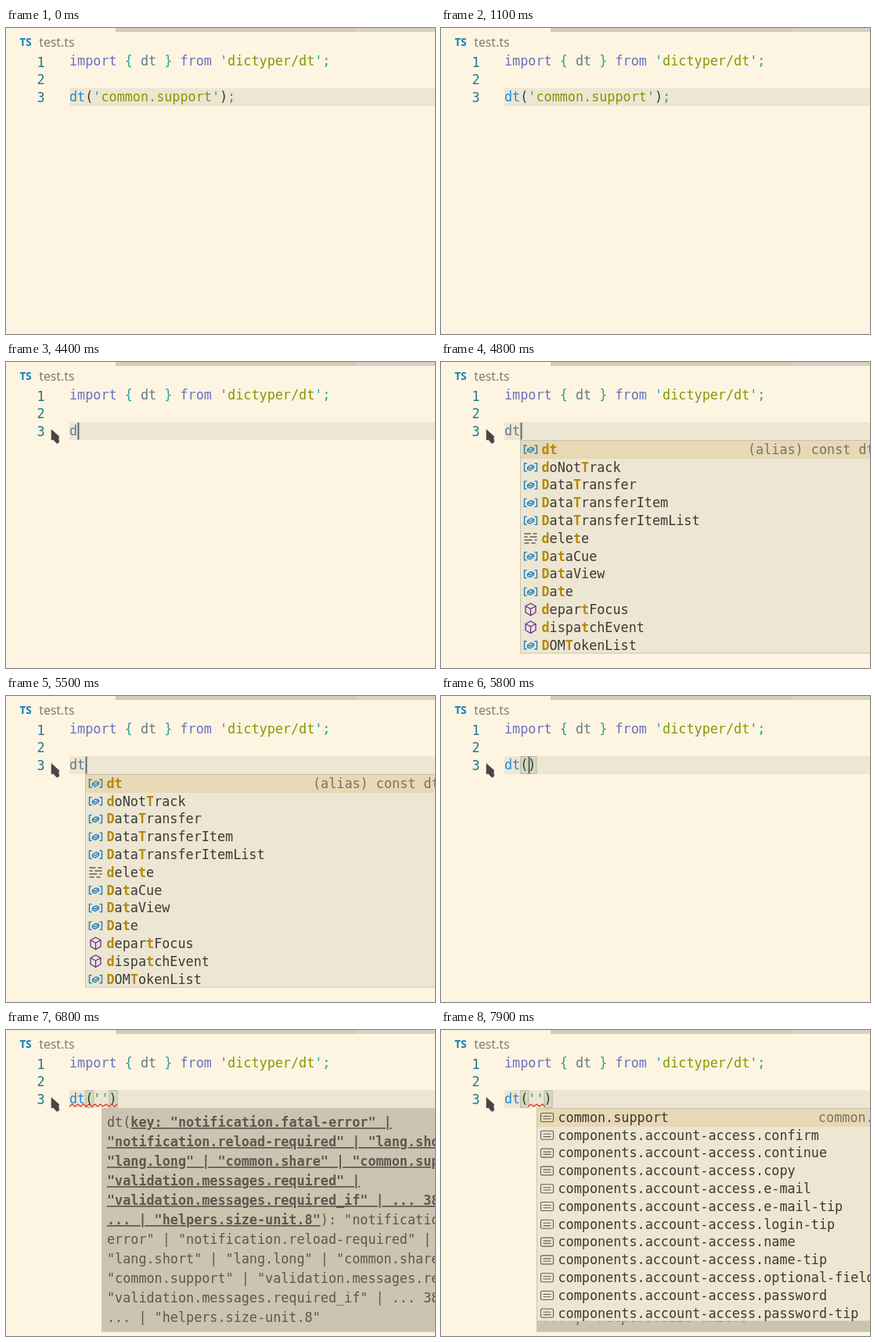
Animation, 548 px wide and 392 px high, one loop 8000 ms. Source, as an HTML page:

```html
<!DOCTYPE html>
<html lang="en">
<head>
<meta charset="utf-8">
<title>Typed dictionary keys</title>
<style>
  html, body { margin: 0; width: 100%; height: 100%; overflow: hidden; background: #fdf5e2; }
  svg { display: block; }
  text { white-space: pre; font: 16.8px "DejaVu Sans Mono", "Noto Sans Mono", monospace; }
  .ui { font: 15.8px "Noto Sans", "Open Sans", sans-serif; }
  .badge { font: 700 13.5px "Noto Sans", "Open Sans", sans-serif; }
  .b { font-weight: 700; }
  .u { font-weight: 700; text-decoration: underline; }
</style>
</head>
<body>
<svg id="stage" width="548" height="392" viewBox="0 0 548 392" xmlns="http://www.w3.org/2000/svg"></svg>
<script>
const LOOP = 8000, STEP = 100;
const CHAR = 10.11, ROW = 22.8, LEFT = 81;
const INK = '#657b83', BLUE = '#268bd2', CYAN = '#2aa198', GREEN = '#859900',
      VIOLET = '#6c71c4', DARK = '#3d3a34', GOLD = '#b58900', SIG = '#5c5850';

const T = { select: 3600, clear: 4000, d: 4400, t: 4500, words: 4700,
            paren: 5600, hint: 5900, quote: 6200, recheck: 6900, keys: 7100 };
const EDITS = [T.clear, T.d, T.t, T.paren, T.quote];

const col = n => LEFT + n * CHAR;
const esc = s => s.replace(/&/g, '&amp;').replace(/</g, '&lt;');
const rect = (x, y, w, h, fill, extra = '') =>
  `<rect x="${x}" y="${y}" width="${w}" height="${h}" fill="${fill}" ${extra}/>`;
const path = (d, stroke, width = 1.2, fill = 'none') =>
  `<path d="${d}" fill="${fill}" stroke="${stroke}" stroke-width="${width}" stroke-linejoin="round"/>`;
// Each run is [text, colour, class].
const text = (x, y, runs, cls = '') => `<text x="${x}" y="${y}" class="${cls}">` +
  runs.map(([s, fill, c = '']) => `<tspan fill="${fill}" class="${c}">${esc(s)}</tspan>`).join('') + '</text>';

const icons = {
  variable: (x, y) => path(`M${x - 5} ${y - 5}h-3v10h3M${x + 5} ${y - 5}h3v10h-3`, '#1a80bb', 1.4) +
    path(`M${x - 4} ${y}l4.5 -3l3.5 1.5v2.5l-4.5 3l-3.5 -1.5zl3.5 1.3l4.5 -2.8`, '#1a80bb', 1.3),
  keyword: (x, y) => path(`M${x - 8} ${y - 6}h8m3 0h5M${x - 8} ${y - 2}h4m3 0h9` +
    `M${x - 8} ${y + 2}h10m3 0h3M${x - 8} ${y + 6}h6m3 0h5`, '#615e56', 1.3),
  method: (x, y) => path(`M${x} ${y - 8}l6.5 3.5v8l-6.5 4l-6.5 -4v-8zM${x - 6.5} ${y - 4.5}` +
    `l6.5 3.5l6.5 -3.5M${x} ${y - 1}v8.5`, '#652d90', 1.3),
  value: (x, y) => rect(x - 8, y - 5.5, 16, 11, 'none', 'rx="1.5" stroke="#625f57" stroke-width="1.1"') +
    path(`M${x - 5} ${y - 1.5}h10M${x - 5} ${y + 1.8}h10`, '#625f57', 1.1)
};

const words = ['dt', 'doNotTrack', 'DataTransfer', 'DataTransferItem', 'DataTransferItemList',
  'delete', 'DataCue', 'DataView', 'Date', 'departFocus', 'dispatchEvent', 'DOMTokenList'];
const wordIcon = w => w === 'delete' ? 'keyword' : /^d[ei]/.test(w) ? 'method' : 'variable';
const keys = ['common.support', ...['confirm', 'continue', 'copy', 'e-mail', 'e-mail-tip', 'login-tip',
  'name', 'name-tip', 'optional-field', 'password', 'password-tip'].map(k => 'components.account-access.' + k)];

// Bold the letters that match the typed "dt".
function matched(word) {
  const i = word.includes('T') ? word.indexOf('T') : word.indexOf('t');
  return [[word[0], GOLD, 'b'], [word.slice(1, i), DARK], [word[i], GOLD, 'b'], [word.slice(i + 1), DARK]];
}

function popup(x, items, iconOf, runsOf, detail, detailX) {
  let out = rect(x + .5, 100.5, 600, 272.5, '#ede6d3', 'stroke="#c8c2b0"') +
    rect(x + 1, 101, 600, 23, '#e7d9b5');
  items.forEach((item, i) => {
    const y = 112 + i * ROW;
    out += icons[iconOf(item)](x + 13.5, y) + text(x + 27.5, y + 5.8, runsOf(item));
  });
  return out + text(detailX, 117.8, [[detail, '#7b7362']]);
}

const union = [
  'key: "notification.fatal-error" |',
  '"notification.reload-required" | "lang.short" |',
  '"lang.long" | "common.share" | "common.support" |',
  '"validation.messages.required" |',
  '"validation.messages.required_if" | ... 38 more',
  '... | "helpers.size-unit.8"'
];
const result = [
  'error" | "notification.reload-required" |',
  '"lang.short" | "lang.long" | "common.share" |',
  '"common.support" | "validation.messages.required" |',
  '"validation.messages.required_if" | ... 38 more',
  '... | "helpers.size-unit.8"'
];
function signature(x) {
  const lines = union.map(s => [[s, SIG, 'u']]).concat(result.map(s => [[s, SIG]]));
  lines[0].unshift(['dt(', SIG]);
  lines[5].push(['): "notification.fatal-', SIG]);
  return rect(x, 100, 600, 287, '#ccc4b0') +
    lines.map((runs, i) => text(x + 7, 124 + i * 25, runs)).join('');
}

function squiggle(from, to) {
  let d = `M${from} 98`;
  for (let x = from, up = true; x < to - 1; x += 3.6, up = !up) d += `l3.6 ${up ? -3 : 3}`;
  return path(d, '#e0301e', 1.2);
}

const bracket = n => rect(col(n) + .5, 77.5, CHAR, 22, 'rgba(0,100,0,.1)', 'stroke="#b9b9a8"');

// Pointer route: [time, x, y]
const route = [[2100, 407, 248], [2200, 330, 200], [2300, 246, 160], [2500, 246, 160], [2600, 290, 148],
  [2700, 314, 122], [2800, 305.5, 105.5], [3000, 210, 98], [3200, 110, 92], [3400, 58, 87]];
function pointer(t) {
  if (t < route[0][0]) return '';
  let [, x, y] = route[route.length - 1];
  const i = route.findIndex(p => p[0] > t);
  if (i > 0) {
    const [t0, x0, y0] = route[i - 1], [t1, x1, y1] = route[i], k = (t - t0) / (t1 - t0);
    x = x0 + (x1 - x0) * k;
    y = y0 + (y1 - y0) * k;
  }
  if (x < 75) {
    const arrow = `M${x} ${y - .5}v13.5l2.5 -.5l4.5 5l3 -2l-1 -5l1 -2z`;
    return path(arrow, '#fffaf0', 2.4) + path(arrow, '#494743', .6, '#494743');
  }
  const beam = `M${x - 3} ${y - 8}h6M${x - 3} ${y + 8}h6M${x} ${y - 8}v16`;
  return path(beam, '#fffdf5', 3) + path(beam, '#45433f', 1.2);
}

function call(t) {
  const fn = ['dt', BLUE], open = ['(', DARK], close = [')', DARK], q = ["'", CYAN];
  if (t < T.clear) return [fn, open, q, ['common.support', GREEN], q, close, [';', CYAN]];
  if (t < T.d) return [];
  if (t < T.t) return [['d', INK]];
  if (t < T.paren) return [['dt', INK]];
  return t < T.quote ? [fn, open, close] : [fn, open, q, q, close];
}

function caret(t) {
  const n = EDITS.filter(e => e <= t).length;
  if (!n || Math.floor((t - EDITS[n - 1]) / 500) % 2) return '';
  return rect(col(n - 1) + .3, 77.5, 2, 22, '#586a70');
}

const frame = rect(0, 0, 548, 392, '#fdf5e2') +
  rect(140, 0, 308, 5, '#d3cbb7') + rect(304.5, 0, 1, 5, '#ddd6c1') + rect(448, 0, 100, 5, '#d9d2c2') +
  text(17.5, 23.3, [['TS', '#0f80bd']], 'badge') + text(42.2, 24, [['test.ts', '#827c70']], 'ui') +
  ['1', '2', '3'].map((n, i) => text(39.6, 49.5 + i * ROW, [[n, '#237893']])).join('');
const imports = text(LEFT, 48, [['import', VIOLET], [' { ', CYAN], ['dt', INK], [' } ', CYAN],
  ['from', VIOLET], [" '", CYAN], ['dictyper/dt', GREEN], ["';", CYAN]]);

function draw(t) {
  const selected = t >= T.select && t < T.clear;
  let out = frame + imports + rect(LEFT, 77, selected ? 21 * CHAR : 467, 23, '#ede6d3');
  if (t >= T.paren) out += bracket(2) + bracket(t < T.quote ? 3 : 5);
  out += text(LEFT, 94, call(t));
  if (t >= T.quote) out += t < T.recheck ? squiggle(LEFT, col(6)) : squiggle(col(3), col(5));
  out += caret(t);
  if (t >= T.hint) out += signature(t < T.quote ? 112 : 122);
  if (t >= T.words && t < T.paren) out += popup(101, words, wordIcon, matched, '(alias) const dt', 392);
  if (t >= T.keys) out += popup(122, keys, () => 'value', k => [[k, DARK]], 'common.support', 482);
  return out + pointer(t);
}

const stage = document.getElementById('stage');
const start = performance.now();
let shown = -1;
function tick() {
  const t = Math.floor((performance.now() - start) % LOOP / STEP) * STEP;
  if (t !== shown) stage.innerHTML = draw(shown = t);
  requestAnimationFrame(tick);
}
tick();
</script>
</body>
</html>
```
